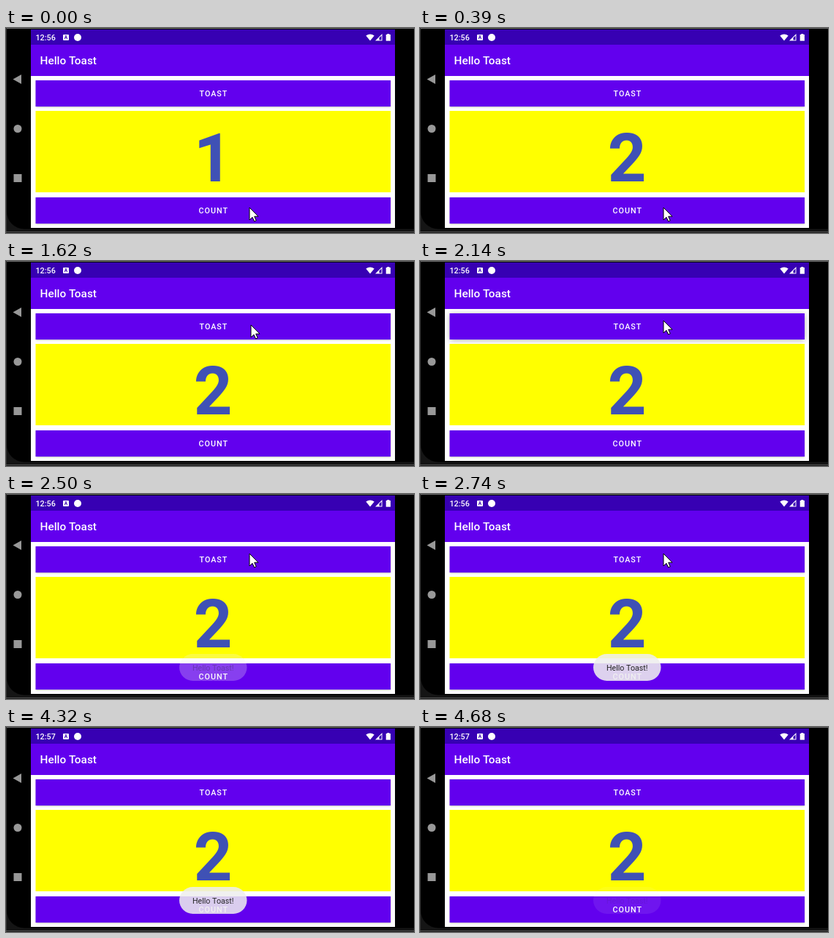
An HTML page with a canvas that plays this animation: 558 by 282 pixels, repeating every 4780 ms.

```html
<!DOCTYPE html>
<html lang="en">
<head>
<meta charset="utf-8">
<title>Hello Toast</title>
<style>
html, body { margin: 0; width: 558px; height: 282px; overflow: hidden; background: #000; }
canvas { display: block; }
</style>
</head>
<body>
<canvas id="stage" width="558" height="282"></canvas>
<script>
const ctx = document.getElementById('stage').getContext('2d');
const LOOP = 4780;
const FONT = 'Roboto, sans-serif';
const PURPLE = '#6200ee', DARK = '#3700b3';

// Each track holds its value until the next time: [ms, value]
const cursorTrack = [
  [0, [333, 247]], [930, [337, 206]], [1050, [340, 152]], [1200, [340, 118]],
  [1320, [340, 105]], [1470, [338, 98]], [1620, [335, 88]], [1740, [333, 82]],
  [3140, [393, 155]], [3260, null]
];
const countTrack = [[0, '1'], [270, '2']];
const clockTrack = [[0, '12:56'], [3540, '12:57']];
const countLift = [[0, 0], [150, 1], [270, 0.5], [390, 0]];
const toastLift = [[0, 0], [2140, 1], [2380, 0.5], [2500, 0]];
const toastAlpha = [
  [0, 0], [2500, 0.3], [2620, 0.75], [2740, 1],
  [4320, 0.98], [4440, 0.78], [4560, 0.42], [4680, 0.1]
];

function at(track, t) {
  let value = track[0][1];
  for (const [time, v] of track) if (t >= time) value = v;
  return value;
}

function rect(x, y, w, h, color) {
  ctx.fillStyle = color;
  ctx.fillRect(x, y, w, h);
}

function poly(points, color) {
  ctx.beginPath();
  points.forEach(([x, y]) => ctx.lineTo(x, y));
  ctx.closePath();
  ctx.fillStyle = color;
  ctx.fill();
}

function disc(x, y, r, color) {
  ctx.beginPath();
  ctx.arc(x, y, r, 0, Math.PI * 2);
  ctx.fillStyle = color;
  ctx.fill();
}

function text(str, x, y, size, weight, color, align = 'left', spacing = 0) {
  ctx.font = `${weight} ${size}px ${FONT}`;
  ctx.letterSpacing = spacing + 'px';
  ctx.textAlign = align;
  ctx.fillStyle = color;
  ctx.fillText(str, x, y);
}

function drawDevice() {
  rect(0, 0, 558, 282, '#151515');
  ctx.beginPath();
  ctx.roundRect(1, 1, 600, 275.5, [4, 0, 0, 24]);
  ctx.fillStyle = '#000';
  ctx.fill();
  rect(0, 0, 558, 1, '#6b6b6b');
  rect(0, 0, 1, 282, '#303030');
  rect(0, 280, 558, 1, '#555');

  const gray = '#989898';
  poly([[9.5, 70.5], [21, 64], [21, 77]], gray);
  disc(16, 138.5, 5.5, gray);
  rect(10.5, 201, 11, 11, gray);
}

function drawStatusBar(clock) {
  rect(34, 2, 498, 21, DARK);
  text(clock, 40.5, 17, 10.75, 500, '#fff');

  ctx.beginPath();
  ctx.roundRect(78, 9, 8, 8, 1);
  ctx.fillStyle = '#fff';
  ctx.fill();
  text('A', 82, 15.4, 6.5, 700, DARK, 'center');
  disc(98, 13, 5, '#fff');

  // Wi-Fi
  ctx.beginPath();
  ctx.moveTo(498, 17.5);
  ctx.lineTo(492.3, 10.6);
  ctx.quadraticCurveTo(498, 6.2, 503.7, 10.6);
  ctx.closePath();
  ctx.fillStyle = '#fff';
  ctx.fill();

  // Mobile signal
  poly([[505, 17.5], [514.5, 8], [514.5, 17.5]], '#fff');
  poly([[510.5, 13.4], [513.5, 10.4], [513.5, 16.5], [510.5, 16.5]], DARK);

  // Battery
  rect(521.3, 8, 3, 1.5, '#fff');
  rect(519.7, 9, 6.2, 8.7, '#fff');
}

function drawButton(label, x, y, lift) {
  ctx.save();
  ctx.shadowColor = `rgba(0,0,0,${0.25 + 0.13 * lift})`;
  ctx.shadowBlur = 2 + 5 * lift;
  ctx.shadowOffsetY = 0.8 + 0.6 * lift;
  rect(40.5, y, 485.5, 36, PURPLE);
  ctx.restore();
  text(label, x, y + 22.2, 10.75, 500, '#fff', 'left', 0.96);
}

function drawToast(alpha) {
  if (!alpha) return;
  ctx.save();
  ctx.globalAlpha = alpha;
  ctx.beginPath();
  ctx.roundRect(237, 220, 92.5, 37, 18.5);
  ctx.fillStyle = 'rgba(238,238,238,0.88)';
  ctx.fill();
  text('Hello Toast!', 283.2, 242.8, 10.65, 400, '#222', 'center');
  ctx.restore();
}

function drawCursor(pos) {
  if (!pos) return;
  ctx.save();
  ctx.translate(pos[0], pos[1]);
  const arrow = [
    [0, 0], [0, 17], [4, 13.3], [6.6, 19], [9.2, 17.9], [6.7, 12.2], [12, 12.2]
  ];
  poly(arrow, '#fff');
  ctx.strokeStyle = '#000';
  ctx.lineWidth = 1;
  ctx.stroke();
  ctx.restore();
}

function draw(t) {
  drawDevice();
  rect(34, 23, 498, 252, '#fff');
  drawStatusBar(at(clockTrack, t));
  rect(34, 23, 498, 43, PURPLE);
  text('Hello Toast', 46.5, 50.3, 15.36, 500, '#fff');

  rect(40.5, 114, 485.5, 112, '#ffff00');
  text(at(countTrack, t), 283.2, 211, 92, 700, '#3f51b5', 'center');
  drawButton('TOAST', 264.6, 72, at(toastLift, t));
  drawButton('COUNT', 263.6, 233, at(countLift, t));

  drawToast(at(toastAlpha, t));
  drawCursor(at(cursorTrack, t));
}

const start = performance.now();
function tick() {
  draw((performance.now() - start) % LOOP);
  requestAnimationFrame(tick);
}
tick();
</script>
</body>
</html>
```
